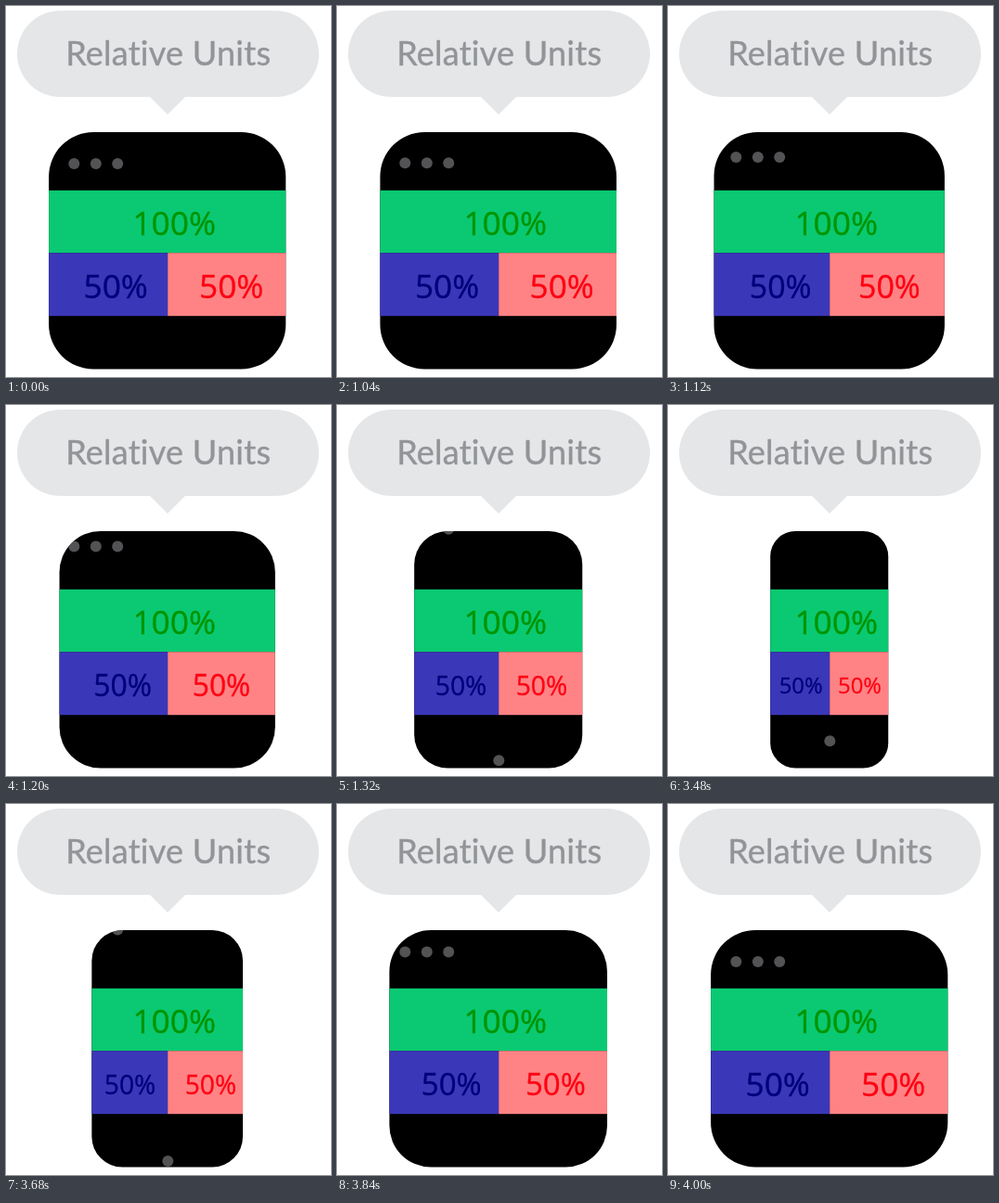
An HTML page that plays this animation: 350x400 px, repeating every 5040 ms.

```html
<!DOCTYPE html>
<html lang="en">
<head>
<meta charset="utf-8">
<title>Relative Units</title>
<style>
  html, body { margin: 0; height: 100%; overflow: hidden; background: #fff; }
  svg { display: block; width: 350px; height: 400px; }
  text {
    font: 35.3px "Open Sans", sans-serif; text-anchor: middle;
    fill: currentColor; stroke: currentColor; stroke-width: .4px;
  }
  .title { font: 36px Lato, sans-serif; letter-spacing: .25px; }
</style>
</head>
<body>
<svg viewBox="0 0 350 400">
  <clipPath id="clip"><rect id="device" y="136" height="255.5"/></clipPath>

  <rect x="12" y="5" width="325" height="93" rx="46.5" fill="#e4e6e8"/>
  <path d="M154 97h40l-20 20z" fill="#e4e6e8"/>
  <text class="title" x="174.7" y="64" color="#929497">Relative Units</text>

  <g clip-path="url(#clip)">
    <rect width="350" height="400"/>
    <g id="dots" fill="#535355">
      <circle cx="73.3" cy="170" r="6"/>
      <circle cx="96.8" cy="170" r="6"/>
      <circle cx="120.2" cy="170" r="6"/>
    </g>
    <circle id="home" cx="174.3" cy="361.5" r="6" fill="#535355"/>
    <rect y="198.8" width="350" height="67.4" fill="#0ac972"/>
    <rect y="266.2" width="174.2" height="68" fill="#3b37b9"/>
    <rect x="174.2" y="266.2" width="176" height="68" fill="#ff8385"/>
  </g>

  <text x="181.2" y="246.5" color="#009400">100%</text>
  <text id="left" y="12.5" color="#00007a">50%</text>
  <text id="right" y="12.5" color="#ff0012">50%</text>
</svg>
<script>
const LOOP = 5040, STEP = 40, STEPS = 14, SHRINK = 1000, GROW = 3440;
const $ = id => document.getElementById(id);
const mix = (a, b, p) => a + (b - a) * p;

// Ease curve with horizontal handles at x1 and x2
const ease = (x1, x2) => x => {
  let lo = 0, hi = 1;
  for (let i = 0; i < 30; i++) {
    const s = (lo + hi) / 2, r = 1 - s;
    if (3 * x1 * s * r * r + 3 * x2 * s * s * r + s ** 3 < x) lo = s; else hi = s;
  }
  return lo * lo * (3 - 2 * lo);
};
const boxEase = ease(.6, .5), iconEase = ease(.34, .63), textEase = ease(1 / 3, 2 / 3);

const progress = (t, start) =>
  Math.min(Math.max(Math.floor((t - start) / STEP), 0), STEPS) / STEPS;

function placeLabel(id, x, scale) {
  $(id).setAttribute("transform", `translate(${x} 302.6) scale(${scale})`);
}

function draw(t) {
  const shrink = progress(t, SHRINK), grow = progress(t, GROW);
  const narrow = curve => curve(shrink) - curve(grow);

  const box = narrow(boxEase), half = mix(127.6, 63.2, box);
  $("device").setAttribute("x", 173.7 - half);
  $("device").setAttribute("width", half * 2);
  $("device").setAttribute("rx", mix(48, 27, box));

  const icon = narrow(iconEase);
  $("dots").setAttribute("transform", `translate(0 ${mix(0, -58, icon)})`);
  $("home").setAttribute("transform", `translate(0 ${mix(58, 0, icon)})`);

  const label = narrow(textEase), scale = mix(1, .67, label);
  placeLabel("left", mix(118.2, 143.5, label), scale);
  placeLabel("right", mix(242.7, 206, label), scale);
}

const begin = performance.now();
function tick() {
  draw((performance.now() - begin) % LOOP);
  requestAnimationFrame(tick);
}
tick();
</script>
</body>
</html>
```
